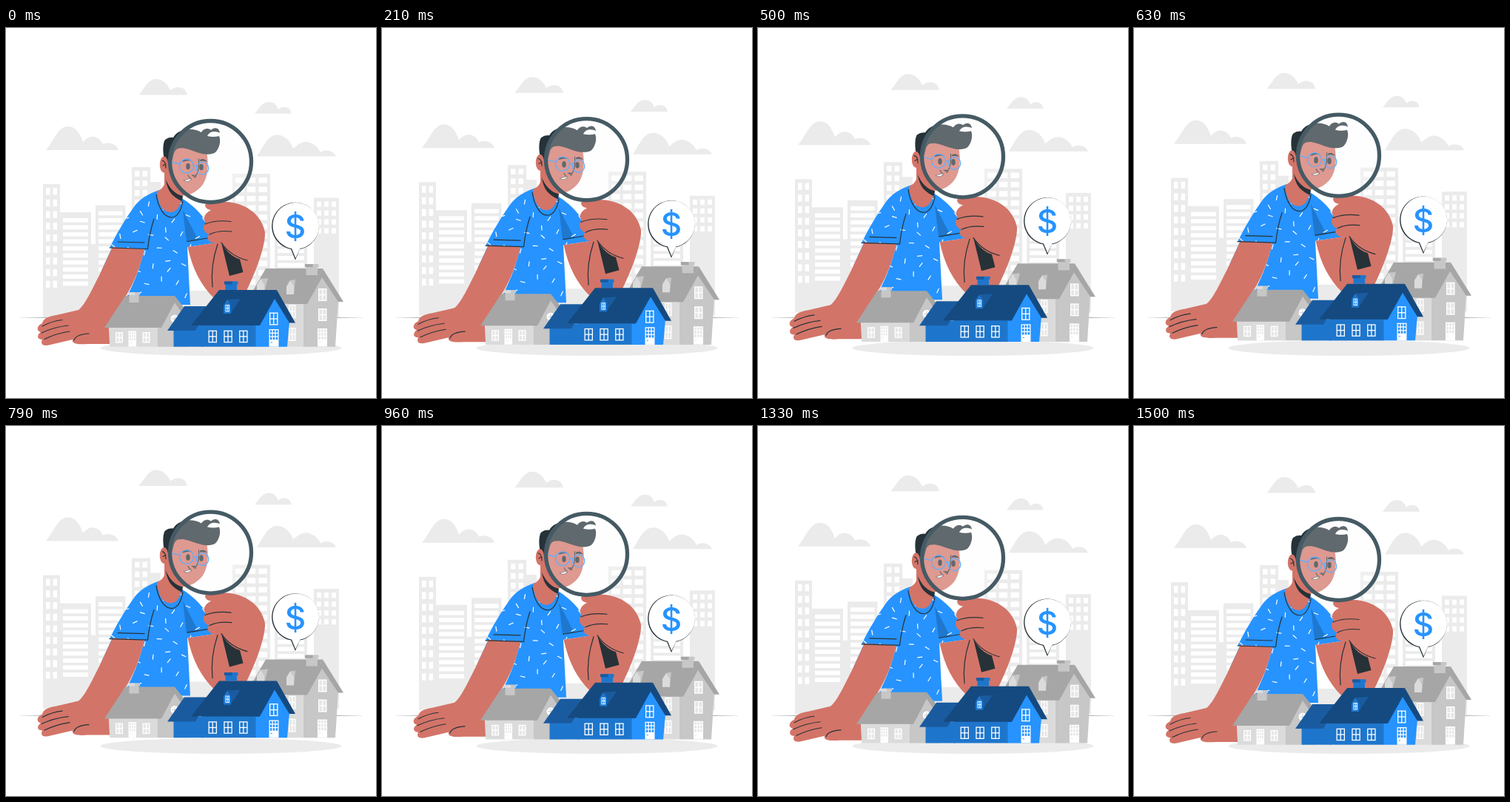
An HTML page that plays this animation: 500 px wide and 500 px high, repeating every 1.54 s.

```html
<!DOCTYPE html>
<html lang="en">
<head>
<meta charset="utf-8">
<title>House search</title>
<style>
  html, body { margin: 0; width: 100%; height: 100%; overflow: hidden; background: #fff; }
  svg { display: block; width: 100%; height: 100%; }
  .ink { fill: none; stroke: #263238; stroke-width: 1.2; stroke-linecap: round; }
  .skin { fill: #d37468; }
  .blue { fill: #2693ff; }
  .dark { fill: #263238; }
  .specs { fill: none; stroke: #2693ff; stroke-width: 1.3; }
</style>
</head>
<body>
<svg viewBox="0 0 500 500">
  <defs>
    <linearGradient id="fade">
      <stop stop-color="#263238" stop-opacity=".1"/>
      <stop offset=".1" stop-color="#263238" stop-opacity=".8"/>
      <stop offset=".9" stop-color="#263238" stop-opacity=".8"/>
      <stop offset="1" stop-color="#263238" stop-opacity=".1"/>
    </linearGradient>
    <clipPath id="cloth"><use href="#shirt"/></clipPath>
  </defs>
  <ellipse cx="290.5" cy="432.5" rx="163" ry="10.5" fill="#ebebeb"/>
  <rect x="18" y="390.9" width="464" height=".7" fill="url(#fade)"/>
  <g id="scene">
    <g fill="#ebebeb">
      <path d="M54 165C65 152 70 133 84 133C96 133 101 146 104 154C109 149 113 146 119 147C127 149 129 153 131 157C139 153 150 157 152 165Z"/>
      <path d="M179.500 90.500C187 82 192 69 203 69C213 69 219 77 222 84C231 77 243 79 245 90.500Z"/>
      <path d="M336 115.700C342 109 346 100 355 100C363 100 366 105 368 110C375 104 385 107 385.500 115.700Z"/>
      <path d="M339 173.500C347 162 353 144.500 366 144.500C378 144.500 386 155 388 163C396 156 401 153 408 154C417 156 422 162 425 168C433 163 443 166 446 173.500Z"/>
    </g>
    <g id="city"></g>

    <!-- shirt and left arm -->
    <path class="blue" d="M145 293L129 328L166 340Z"/>
    <path id="shirt" class="blue" d="M207 219C192 224 180 231 172 243C160 260 150 277 140 297L187 298.500C181 325 173 344 164 362V374H249L245 296L286 290L272 263C262 249 252 239 239 231Z"/>
    <path class="skin" d="M144 296L187 298.500C181 325 173 344 162 362L139 400L140 427H110C98 428 88 427 90 421L60 428C50 431 46 427 49 421C42 421 41 415 47 411C40 409 42 402 49 399C50 393 56 390 68 388L98 381C107 374 117 352 129 328Z"/>
    <path class="ink" d="M49 403Q62 396 76 394.500M48 412Q65 404 84 402M52 420.500Q67 413 86 410M92 422Q94 414 112 413"/>
    <path fill="#1f78cf" d="M239 246L260 287L244 289Z"/>
    <g id="flecks" clip-path="url(#cloth)" stroke="#fff" stroke-width="1.2" stroke-linecap="round"></g>
    <path class="ink" d="M200 258Q194 276 191.500 298.500L140 297M151 289L187 290M245 288.500L272 284"/>

    <!-- neck and head -->
    <path class="skin" d="M214 190V211Q212 217 204 221C206 241 213 249 223 249C231 248 236 242 239 222Z"/>
    <path class="ink" d="M203 225C206 244 214 256 224 256C233 255 237 245 239 234"/>
    <path class="skin" d="M229 160L271 167C274 183 274 203 263 215C254 224 244 228 234 226C222 222 216 211 215 195Z"/>
    <path class="dark" d="M216 205C221 217 229 225 239 227L238 234C226 229 218 221 216 205Z"/>
    <path class="dark" d="M215 182C211 167 212 155 215 151Q220 147 226 148C232 137 250 133 264 141C266 137 272 134 277 138C281 134 288 134 289 142C284 139 275 139 272 146Q280 148 288 146C291 153 288 163 283 168C277 172 267 171 258 168C247 164 240 161 232 163C225 166 227 177 222 184Z"/>
    <ellipse class="skin" cx="213.500" cy="184.500" rx="5.700" ry="11"/>
    <path class="ink" d="M211 179Q216 180 216 189M212 186L216 184"/>
    <g class="dark">
      <ellipse cx="246" cy="187" rx="2.700" ry="4.300"/>
      <ellipse cx="264" cy="188" rx="2.700" ry="4.300"/>
      <path d="M239 179Q246 174 252 180Q246 178 239 181ZM262 178Q268 175 272 181Q267 179 262 180Z"/>
    </g>
    <path class="ink" d="M260.500 177Q261 189 259 195L256 201M256 199L252 199L256 202M246 199L250 205"/>
    <path d="M240 206L251 203Q247 210 240 206Z" fill="#fff" stroke="#263238" stroke-width=".6"/>
    <g class="specs">
      <circle cx="244" cy="186.500" r="9.500"/>
      <circle cx="265.500" cy="189.500" r="8.300"/>
      <path d="M253.500 187Q256 185 257.500 188M235 184L223 181"/>
    </g>

    <!-- right arm and magnifier -->
    <path class="skin" d="M269 239C272 233 286 233 298 235C321 236 345 250 350 276C351 291 340 325 325 355L314 372L282 366C263 348 252 325 245.500 296L285 290C275 292 270 285 274 279C266 276 265 267 270 263C265 257 269 250 277 246C271 245 269 242 269 239Z"/>
    <path class="ink" d="M269 265Q284 259 304 261.500M275 279Q287 273 305 275M286 292Q276 322 279 350"/>
    <path class="dark" d="M291 290L302 335L320.500 330L316 312.500Q301 308 291 290Z"/>
    <path class="ink" d="M291 290Q303 308 326 314"/>
    <circle cx="276.500" cy="180.500" r="55" fill="#fafafa" fill-opacity=".27" stroke="#455a64" stroke-width="5.300"/>

    <g id="houses"></g>

    <!-- price balloon -->
    <path class="dark" d="M385 299A31.900 31.900 0 1 1 397 299L391 313.500Z"/>
    <path fill="#fff" d="M386 298A31.300 31.300 0 1 1 397.500 298L391.300 311Z"/>
    <text class="blue" x="391" y="284" text-anchor="middle" font-family="Inter, sans-serif" font-size="44" font-weight="500">$</text>
  </g>
</svg>
<script>
const $ = id => document.getElementById(id);
const rect = (x, y, w, h, fill) => `<rect x="${x}" y="${y}" width="${w}" height="${h}" fill="${fill}"/>`;
const poly = (points, fill) => `<polygon points="${points}" fill="${fill}"/>`;

// Evenly spaced cells with a margin around each.
function cells(x, y, w, h, cols, rows, gap, fill) {
  const cw = (w - gap) / cols, ch = (h - gap) / rows;
  let out = '';
  for (let r = 0; r < rows; r++)
    for (let c = 0; c < cols; c++)
      out += rect(x + gap + c * cw, y + gap + r * ch, cw - gap, ch - gap, fill);
  return out;
}

// Tower whose white panes repeat downwards at a fixed pitch.
function tower(x, top, w, cols, pitch, end = 354) {
  let out = rect(x, top, w, 391 - top, '#ebebeb');
  for (let y = top + (cols > 1 ? 1 : 4); y + pitch < end; y += pitch)
    out += cells(x, y, w, pitch * .6 + 8, cols, 1, 4, '#fff');
  return out;
}

const pane = (x, y, w, h, wall, cols = 2, rows = 2, gap = 1.3) =>
  rect(x, y, w, h, '#fff') + cells(x, y, w, h, cols, rows, gap, wall);

const door = (x, y, w, h, wall) =>
  rect(x, y, w, h, '#fff') + cells(x, y, w, h * .65, 3, 3, 1.3, wall) + rect(x + 2, y + h * .74, 2.5, .9, wall);

const chimney = (x, y, w, h, body, cap) =>
  rect(x + 1.5, y, w - 3, h, body) + rect(x, y, w * .58, 4, cap) + rect(x + w * .58, y, w * .42, 4, body);

// Dormer with a pointed front and a roof running back to the right.
const dormer = (x, y, depth, front, roof) =>
  poly(`${x + 5},${y} ${x + 5 + depth},${y - 1} ${x + 10},${y + 18}`, roof) +
  poly(`${x},${y + 19} ${x},${y + 8} ${x + 5},${y} ${x + 10},${y + 8} ${x + 10},${y + 19}`, front);

$('city').innerHTML =
  rect(50, 355, 400, 36, '#ebebeb') + rect(110, 292, 60, 64, '#ebebeb') + rect(195, 208, 14, 150, '#ebebeb') +
  tower(50, 211, 23, 2, 15.7) + tower(73, 249, 42, 1, 9.5) + tower(121, 239.5, 40.5, 1, 9.5) +
  tower(170, 188, 25, 2, 13) + tower(306, 197, 51, 3, 12.5) + tower(363, 262, 44, 1, 9.5) +
  tower(416, 229.5, 34, 3, 12, 280);

// Low-discrepancy scatter keeps the flecks apart.
for (let i = 1; i <= 60; i++) {
  const x = 140 + 146 * (i * .7549 % 1), y = 222 + 150 * (i * .5698 % 1);
  $('flecks').innerHTML += `<path d="M-3 0H3" transform="translate(${x} ${y}) rotate(${i * 67})"/>`;
}

const roof = '#a6a6a6', side = '#c7c7c7', front = '#dbdbdb', pale = '#e6e6e6';
const navy = '#154a80', deep = '#1a5ba0', mid = '#1e76cc', sky = '#2693ff';

const farHouse =
  rect(336, 366, 66, 64.7, front) +
  poly('402,366 427,332 449,368 445,430.700 402,430.700', side) +
  poly('325,370 351,325 428,325 403,373 385,373', roof) +
  poly('428,325 456,370 449,370 427,337 407,373 402,373', roof) +
  chimney(404, 319, 18.5, 15, side, roof) +
  dormer(339, 339, 10, front, side) + dormer(379, 341, 7, front, side) +
  [374, 405].map(y => pane(382, y, 9.5, 18, pale)).join('') +
  [352, 379].map(y => pane(422, y, 11.5, 17, pale)).join('') + door(421, 406, 13, 24.5, pale);

const nearHouse =
  rect(140, 402, 65, 28.7, front) +
  poly('205,403 227,366 246,394 246,430.700 205,430.700', side) +
  poly('133,405 161,362 228,362 207,405', roof) +
  poly('228,362 247,386 241,390 228,371 210,405 205,405', roof) +
  chimney(165, 357, 16, 14, side, front) +
  '<circle cx="228" cy="393" r="5.500" fill="#fff"/><path d="M228 389v8m-4-4h8" stroke="#c7c7c7" stroke-width=".9"/>' +
  [148, 184.5].map(x => pane(x, 411, 10, 14.5, pale)).join('') + door(165.5, 409.5, 10.5, 21, pale);

const blueHouse =
  rect(226.5, 402, 40, 28.7, mid) + poly('218,409 241,376 274,376 256,409', deep) +
  rect(264.5, 400, 73.5, 30.7, mid) +
  poly('337.500,402 364,362 383,397 380,430.700 337.500,430.700', sky) +
  poly('250,402 288,354 366,354 342,402', navy) +
  poly('366,354 391,398.500 383,398.500 363,366 343,402 337,402', navy) +
  chimney(295, 342.5, 18.5, 11.5, mid, deep) +
  dormer(294, 367, 18, mid, deep) + pane(296.5, 374, 5.5, 9.5, sky, 2, 2, .8) +
  [0, 1, 2].map(i => pane(273.5 + 20.8 * i, 408.7, 11.5, 16.5, mid)).join('') +
  pane(356, 384.5, 11.5, 17, sky) + door(355.5, 407, 13, 23.7, sky);

$('houses').innerHTML = farHouse + nearHouse + blueHouse;

// The scene rises and sinks by 10 px at 24 steps per second, resting for the last step.
const start = performance.now();
function frame(now) {
  const time = Math.max(0, now - start) % 1540;
  const step = Math.min(36, Math.floor(time * .024 + .1));
  const lift = 10 * (1 - Math.abs(1 - step / 18));
  $('scene').setAttribute('transform', `translate(0 ${-lift})`);
  requestAnimationFrame(frame);
}
frame(start);
</script>
</body>
</html>
```
